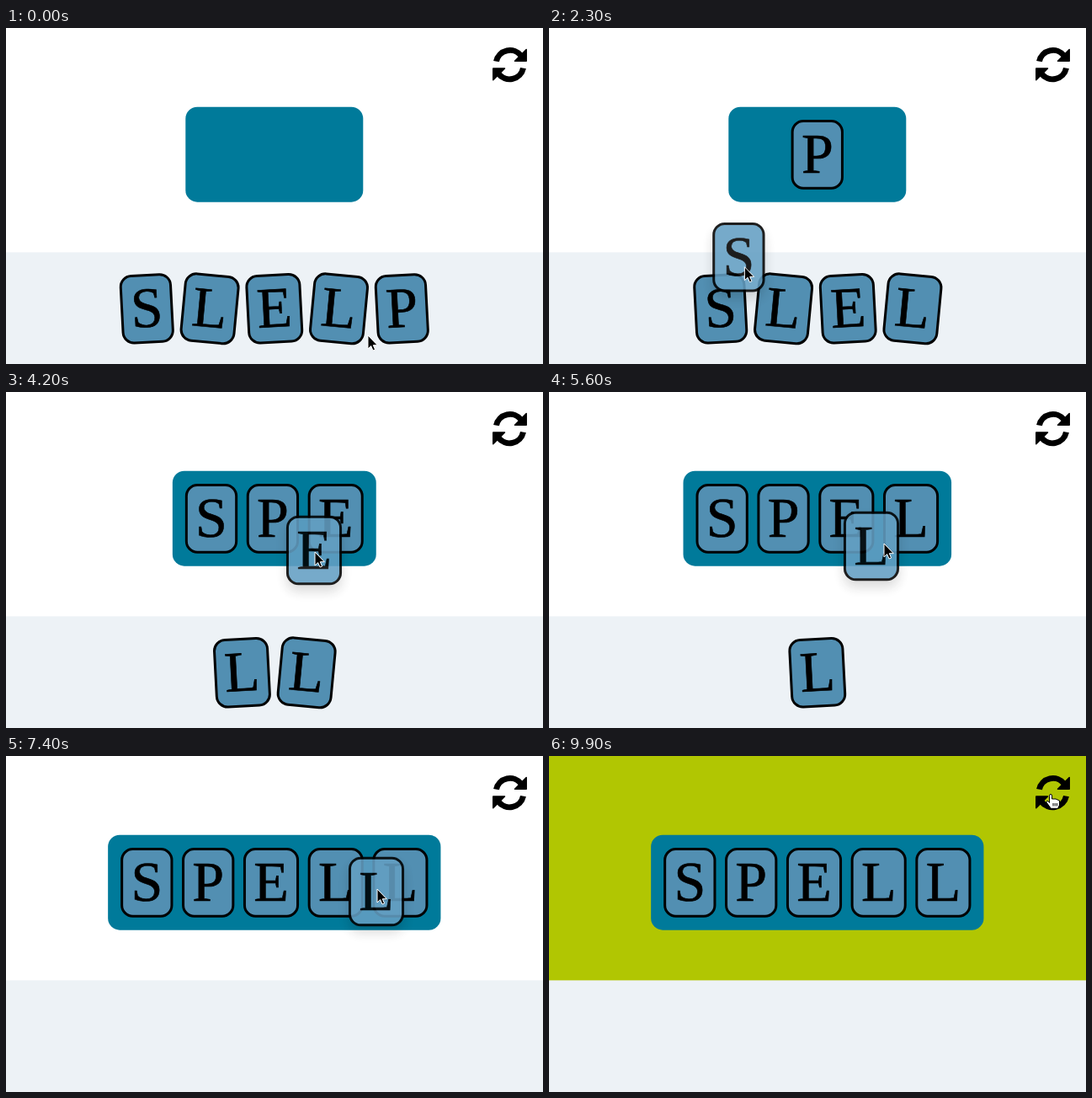
Write an HTML page that moves like this. It is 638 by 399 pixels and loops after 10000 ms.

```html
<!DOCTYPE html>
<html lang="en">
<head>
<meta charset="utf-8">
<title>Spelling tiles</title>
<style>
  html, body { margin: 0; width: 100%; height: 100%; overflow: hidden; background: #fff; }
  svg { display: block; width: 638px; height: 399px; }
  .tray { fill: #edf2f6; }
  .zone { fill: #007a9a; }
  .card rect { fill: #528fb2; stroke: #000; stroke-width: 3; }
  .card text {
    font: 68px "Liberation Serif", "Times New Roman", serif;
    text-anchor: middle; stroke: #000; stroke-width: .6;
  }
  .drag { opacity: .88; filter: drop-shadow(0 8px 7px rgba(0, 0, 0, .16)); }
  .drag rect { fill: #649fc3; }
  .arc { fill: none; stroke: #000; stroke-width: 7; }
  .head { stroke: #000; stroke-width: 1.5; stroke-linejoin: round; }
</style>
</head>
<body>
<svg viewBox="0 0 638 399">
  <rect id="sky" width="638" height="267" fill="#fff"/>
  <rect class="tray" y="266.4" width="638" height="133"/>
  <rect id="zone" class="zone" y="93.7" height="113" rx="14"/>
  <defs>
    <g id="half">
      <path class="arc" d="M582.5 39.6A16.6 16.6 0 0 1 612 33"/>
      <path class="head" d="M618.2 25.5V39.2H604.5Z"/>
    </g>
  </defs>
  <use href="#half"/>
  <use href="#half" transform="rotate(180 598.5 43.6)"/>
  <g id="cards"></g>
  <path id="arrow" stroke="#fff" d="M0 0V16L3.7 12.6L6 18L8.6 17L6.3 11.7H11.3Z"/>
  <path id="hand" fill="#fff" stroke="#000" stroke-linejoin="round"
    d="M-2.5 9.5V1.2Q-2.5 -.5 -1 -.5T.6 1.2V5H5L9.5 7V12L7.6 16.3H-.7L-5.4 9.8Q-6.5 8 -5.3 7.4T-2.5 9.5M2 10V13.5M4.2 10V13.5M6.4 10V13.5"/>
</svg>
<script>
const LOOP = 10000, CENTER = 318.8, GAP = 10.6, SLIDE = 200, PAUSE = 100;
const SOLVED = 7750, LEAVE = 8150, ARRIVE = 9050;
const START = { x: 430, y: 365 }, BUTTON = { x: 597, y: 46 };
const letters = [...'SLELP'], word = 'SPELL';
const ids = [...letters.keys()];
const width = id => 'SP'.includes(letters[id]) ? 62.3 : 66.1;

// to: pointer above the box; dx, dy: where it holds the card, from the middle
const moves = [
  { id: 4, grab: 450, drop: 1350, to: { x: 395, y: 170 }, dx: 12.5, dy: 2.5 },
  { id: 0, grab: 1900, drop: 3100, to: { x: 268, y: 183 }, dx: 7, dy: 11.5 },
  { id: 2, grab: 3680, drop: 4300, to: { x: 367, y: 190 }, dx: 1, dy: 2 },
  { id: 3, grab: 4950, drop: 5700, to: { x: 398, y: 180 }, dx: 15, dy: -3 },
  { id: 1, grab: 6350, drop: 7500, to: { x: 441, y: 158 }, dx: 1, dy: -3 }
];

const $ = id => document.getElementById(id);
const ramp = (t, a, b) => Math.max(0, Math.min(1, (t - a) / (b - a)));
const smooth = u => u * u * (3 - 2 * u);
const easeOut = u => 1 - (1 - u) ** 3;
const mix = (a, b, u) => a + (b - a) * u;
const mixPose = (a, b, u) => ({ x: mix(a.x, b.x, u), y: mix(a.y, b.y, u), r: mix(a.r, b.r, u) });
const show = (el, on) => el.setAttribute('visibility', on ? 'visible' : 'hidden');
const rowWidth = row => row.reduce((sum, id) => sum + width(id) + GAP, -GAP);

// Card poses once the first n moves have reached the box
function layout(n) {
  const moved = moves.slice(0, n).map(m => m.id);
  const tray = ids.filter(id => !moved.includes(id));
  const rank = id => word.indexOf(letters[id]);
  const zone = moved.sort((a, b) => rank(a) - rank(b));
  const poses = [];
  const place = (row, y, turn) => {
    let x = CENTER - rowWidth(row) / 2;
    row.forEach((id, i) => {
      poses[id] = { x: x + width(id) / 2, y, r: turn(i) };
      x += width(id) + GAP;
    });
  };
  place(zone, 150.4, () => 0);
  place(tray, 333.3, i => i % 2 ? 5.4 : -3);
  return { poses, zoneWidth: Math.max(181, rowWidth(zone)) + 30 };
}
const layouts = [0, ...moves.map((_, i) => i + 1)].map(layout);

// The drag fills most of the hold; the card enters the box partway through it
moves.forEach((m, i) => {
  const card = layouts[i].poses[m.id];
  m.from = { x: card.x + m.dx, y: card.y + m.dy };
  m.hover = mix(m.grab, m.drop, .8);
  m.enter = mix(m.grab, m.hover, .65);
});

function pointer(t) {
  let p = START, left = 0;
  for (const m of moves) {
    p = mixPose(p, m.from, smooth(ramp(t, left, m.grab - PAUSE)));
    p = mixPose(p, m.to, smooth(ramp(t, m.grab, m.hover)));
    left = m.drop;
  }
  return { ...mixPose(p, BUTTON, smooth(ramp(t, LEAVE, ARRIVE))), r: 0 };
}

function makeCard(id, cls) {
  const w = width(id);
  $('cards').insertAdjacentHTML('beforeend',
    `<g class="${cls}"><rect x="${1.5 - w / 2}" y="-39.8" width="${w - 3}" height="79.6" rx="13"/>` +
    `<text y="21.7">${letters[id]}</text></g>`);
  return $('cards').lastElementChild;
}
const cards = ids.map(id => makeCard(id, 'card'));
const clones = moves.map(m => makeCard(m.id, 'card drag'));

function setPose(el, p) {
  el.setAttribute('transform', `translate(${p.x} ${p.y}) rotate(${p.r})`);
}

function dragPose(m, slot, t) {
  const p = pointer(Math.min(t, m.drop));
  const held = { x: p.x - m.dx, y: p.y - m.dy, r: 0 };
  return mixPose(held, slot, easeOut(ramp(t, m.drop, m.drop + SLIDE)));
}

function draw(t) {
  const n = moves.filter(m => t >= m.enter).length;
  const now = layouts[n], last = moves[n - 1];

  cards.forEach((el, id) => {
    const slides = last && last.id !== id;
    setPose(el, slides
      ? mixPose(layouts[n - 1].poses[id], now.poses[id], easeOut(ramp(t, last.enter, last.enter + SLIDE)))
      : now.poses[id]);
  });
  moves.forEach((m, i) => {
    const held = t >= m.grab && t < m.drop + SLIDE;
    show(clones[i], held);
    if (held) setPose(clones[i], dragPose(m, layouts[i + 1].poses[m.id], t));
  });

  $('zone').setAttribute('x', CENTER - now.zoneWidth / 2);
  $('zone').setAttribute('width', now.zoneWidth);
  $('sky').setAttribute('fill', t < SOLVED ? '#fff' : '#b1c602');

  const p = pointer(t);
  setPose($('arrow'), p);
  setPose($('hand'), p);
  show($('arrow'), t < ARRIVE - PAUSE);
  show($('hand'), t >= ARRIVE - PAUSE);
}

const start = performance.now();
function tick() {
  draw((performance.now() - start) % LOOP);
  requestAnimationFrame(tick);
}
tick();
</script>
</body>
</html>
```
